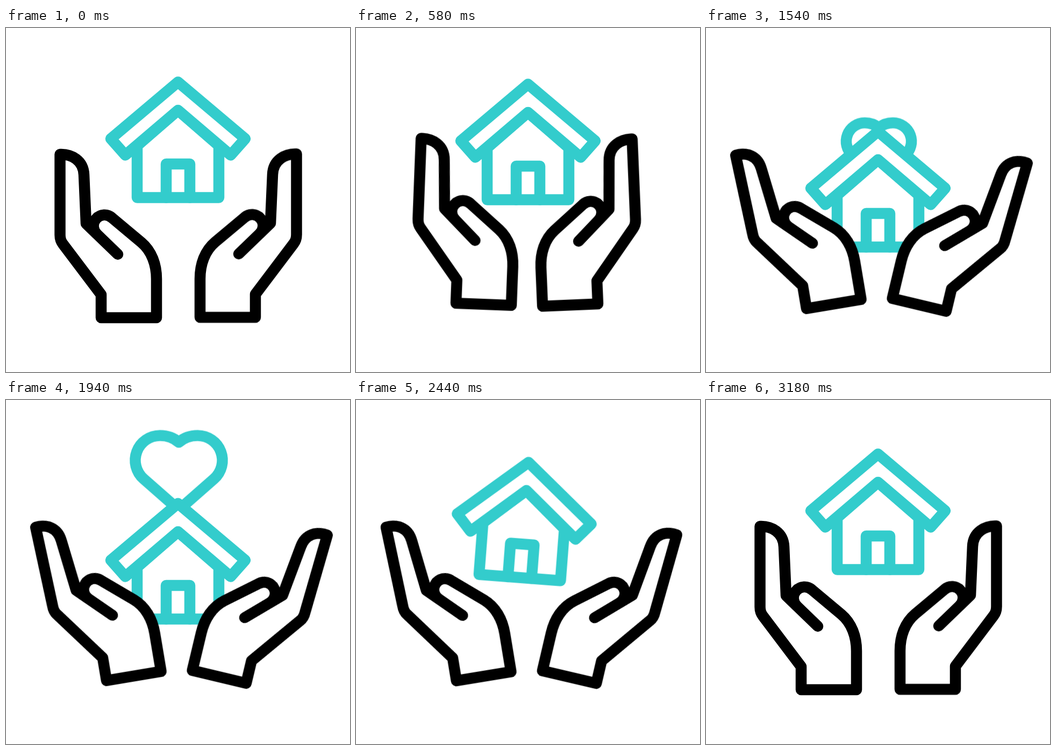
Recreate the animation shown at these times as an HTML page without scripts. Size 640 px wide and 640 px high, loop 3560 ms.

```html
<!DOCTYPE html>
<html lang="en">
<head>
<meta charset="utf-8">
<title>House in caring hands</title>
<style>
  html, body { margin: 0; width: 100%; height: 100%; overflow: hidden; background: #fff; }
  svg { display: block; width: 100vw; height: 100vh; }
  path {
    fill: #fff;
    stroke-width: 20.5;
    stroke-linecap: round;
    stroke-linejoin: round;
  }
  .house, .heart { stroke: #3cc; }
  .heart, .door { fill: none; }
  .house, .hand, .heart { animation: 3560ms linear infinite; }

  .heart {
    vector-effect: non-scaling-stroke;
    transform-origin: 0 0;
    animation-name: beat, show;
  }
  .house { transform-origin: 320px 114px; animation-name: toss; }

  .hand {
    stroke: #000;
    transform-origin: 177px 539px;
    animation-name: pose, finger;
  }
  .left {
    --lift: translate(9px, -27px) rotate(2.2deg);
    --open: translate(10px, -17px) rotate(-9.5deg);
  }
  .right {
    --lift: translate(14px, -25px) rotate(2.4deg);
    --open: translate(17.2px, -11.3px) rotate(-13.4deg);
  }

  @keyframes pose {
    0%, 6.18% { transform: translate(0, 0) rotate(0deg); animation-timing-function: ease-in-out; }
    16.57% { transform: var(--lift); animation-timing-function: cubic-bezier(.4, .1, .6, .95); }
    23.88% { transform: var(--open); }
    67.42% { transform: var(--open); animation-timing-function: cubic-bezier(.4, 0, .4, 1); }
    80.34% { transform: translate(0, 0) rotate(.3deg); animation-timing-function: ease-in-out; }
    89.33%, 100% { transform: translate(0, 0) rotate(0deg); }
  }

  @keyframes finger {
    0%, 16.57%, 80.34%, 100% {
      d: path("M100.5 235C121 234 144 246 145 273L149 364L169.6 383.9A20.6 20.6 0 0 1 197 353L252 399C271 415 280 440 280 467L280 539L177 539L177 496L106 402C102 397 100.5 391 100.5 385ZM149 364L208 421");
      animation-timing-function: ease-in-out;
    }
    23.88%, 67.42% {
      d: path("M94 236C115 233.500 134 243 137 268L149 364L169.6 383.9A20.6 20.6 0 0 1 197 353L252 399C271 415 280 440 280 467L280 539L177 539L177 496L106 402C102 397 101 391 101 385ZM149 364L208 421");
      animation-timing-function: ease-in-out;
    }
  }

  @keyframes toss {
    0%, 6.18% { transform: translateY(0) rotate(0deg); animation-timing-function: ease-in-out; }
    16.57% { transform: translateY(4px) rotate(0deg); animation-timing-function: ease-in-out; }
    20.22% { transform: translateY(-16.5px) rotate(0deg); animation-timing-function: cubic-bezier(.45, .05, .7, .9); }
    25% { transform: translateY(92px) rotate(0deg); }
    62.92% { transform: translateY(92px) rotate(0deg); animation-timing-function: cubic-bezier(.4, .2, .8, .8); }
    68.54% { transform: translateY(16px) rotate(4.4deg); animation-timing-function: cubic-bezier(.3, .5, .6, 1); }
    71.91% { transform: translateY(-24px) rotate(2deg); animation-timing-function: ease-in-out; }
    78.65% { transform: translateY(4px) rotate(-1deg); animation-timing-function: ease-in-out; }
    89.33%, 100% { transform: translateY(0) rotate(0deg); }
  }

  @keyframes beat {
    0%, 17.98% { transform: translate(321.5px, 227px) scale(.503); animation-timing-function: cubic-bezier(.2, .15, .8, .85); }
    29.21%, 51.69% { transform: translate(321.5px, 15.5px) scale(1.168); animation-timing-function: cubic-bezier(.2, .15, .8, .85); }
    40.45% { transform: translate(321.5px, 227px) scale(.662); animation-timing-function: cubic-bezier(.2, .15, .8, .85); }
    62.92%, 100% { transform: translate(321.5px, 227px) scale(.662); }
  }

  @keyframes show {
    0%, 63.2%, 100% { opacity: 0; animation-timing-function: step-end; }
    17.98% { opacity: 1; animation-timing-function: step-end; }
  }
</style>
</head>
<body>
<svg viewBox="0 0 640 640">
  <path class="heart" d="M0 12C-9 4-21 0-33.5 0A44 44 0 0 0-62.5 77L0 132L62.5 77A44 44 0 0 0 33.5 0C21 0 9 4 0 12Z"/>
  <g class="house">
    <path d="M244 315.500V219L320 153L396 219V315.500Z"/>
    <path class="door" d="M298 315.500V253H342V315.500"/>
    <path d="M320 100.500L445 206L418 236.500L320 153L222 236.500L195 206Z"/>
  </g>
  <path class="hand left"/>
  <g transform="translate(641 -.7) scale(-1 1)">
    <path class="hand right"/>
  </g>
</svg>
</body>
</html>
```
